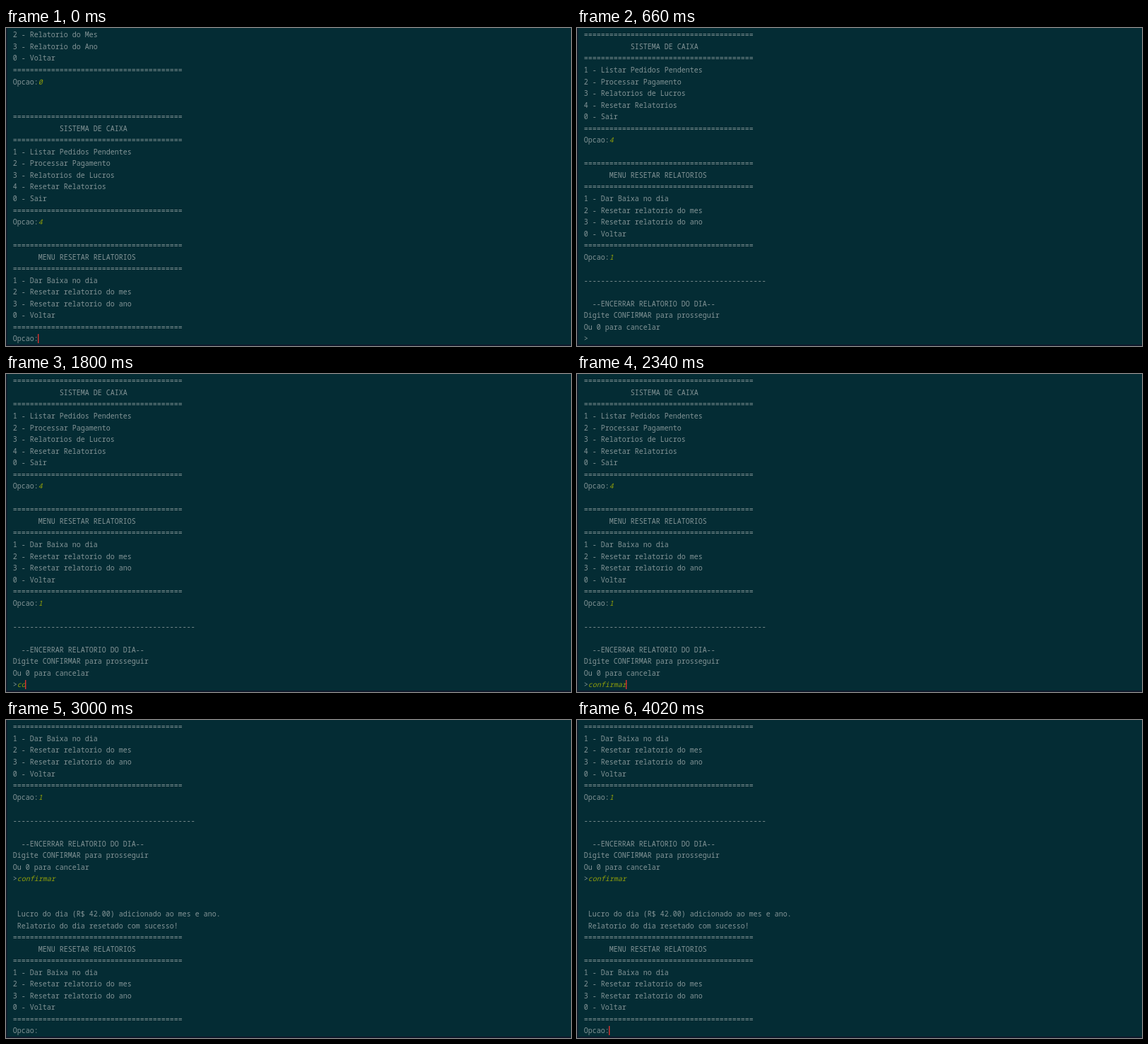
These frames come from a looping animation (800 by 450 pixels, 4080 ms). An HTML page with a canvas:

```html
<!DOCTYPE html>
<html lang="pt">
<head>
<meta charset="utf-8">
<style>
html, body { margin: 0; width: 800px; height: 450px; overflow: hidden; background: #042c34; }
canvas { display: block; }
</style>
</head>
<body>
<canvas id="stage" width="800" height="450"></canvas>
<script>
const ctx = document.getElementById('stage').getContext('2d');
const LOOP = 4080, ROWS = 27, PITCH = 16.54, LEFT = 9.7, CHAR = 6;
const FONT = '10px "Noto Sans Mono", "DejaVu Sans Mono", monospace';
const RULE = '='.repeat(40);

const resetMenu = [
  RULE, '      MENU RESETAR RELATORIOS', RULE,
  '1 - Dar Baixa no dia',
  '2 - Resetar relatorio do mes',
  '3 - Resetar relatorio do ano',
  '0 - Voltar', RULE, 'Opcao:'
];

const lines = [
  '2 - Relatorio do Mes', '3 - Relatorio do Ano', '0 - Voltar', RULE, 'Opcao:', '', '',
  RULE, '           SISTEMA DE CAIXA', RULE,
  '1 - Listar Pedidos Pendentes',
  '2 - Processar Pagamento',
  '3 - Relatorios de Lucros',
  '4 - Resetar Relatorios',
  '0 - Sair', RULE, 'Opcao:', '',
  ...resetMenu, '',
  '-'.repeat(43), '',
  '  --ENCERRAR RELATORIO DO DIA--',
  'Digite CONFIRMAR para prosseguir',
  'Ou 0 para cancelar',
  '>', '', '',
  ' Lucro do dia (R$ 42.00) adicionado ao mes e ano.',
  ' Relatorio do dia resetado com sucesso!',
  ...resetMenu
];

// Typed answers by line: text, start time, ms per character
const inputs = {
  4: ['0', -1, 1],
  16: ['4', -1, 1],
  26: ['1', 300, 1],
  33: ['confirmar', 1680, 65]
};

// Scroll: start time, first visible line, pixel offset
const scrolls = [[0, 0, 0], [540, 1, 0], [660, 7, 0], [2460, 8, 0], [2580, 19, 1], [2640, 20, 0]];

// Caret: start, end, opacity
const carets = [[0, 540, 1], [540, 660, 0.5], [1200, 2520, 1], [3010, 3510, 1], [4010, LOOP, 1]];

function typed(line, t) {
  if (!inputs[line]) return '';
  const [text, start, step] = inputs[line];
  return t < start ? '' : text.slice(0, Math.floor((t - start) / step) + 1);
}

function draw(t) {
  const [, top, dy] = scrolls.findLast(s => t >= s[0]);
  ctx.fillStyle = '#042c34';
  ctx.fillRect(0, 0, 800, 450);

  for (let row = 0; row < ROWS; row++) {
    const line = top + row, y = Math.round(13.4 + row * PITCH + dy);
    ctx.font = FONT;
    ctx.fillStyle = '#839496';
    ctx.fillText(lines[line], LEFT, y);
    ctx.font = 'italic ' + FONT;
    ctx.fillStyle = '#909f0a';
    ctx.fillText(typed(line, t), LEFT + lines[line].length * CHAR, y);
  }

  const caret = carets.find(c => t >= c[0] && t < c[1]);
  if (caret) {
    const last = top + ROWS - 1;
    const column = lines[last].length + typed(last, t).length;
    ctx.globalAlpha = caret[2];
    ctx.fillStyle = '#dc322f';
    ctx.fillRect(LEFT + column * CHAR - 0.7, 433, 1.4, 13);
    ctx.globalAlpha = 1;
  }

  ctx.fillStyle = '#10192b';
  ctx.fillRect(0, 0, 1.5, 450);
  ctx.fillRect(0, 448, 800, 2);
}

const origin = performance.now();
function tick() {
  draw((performance.now() - origin) % LOOP);
  requestAnimationFrame(tick);
}
tick();
</script>
</body>
</html>
```
